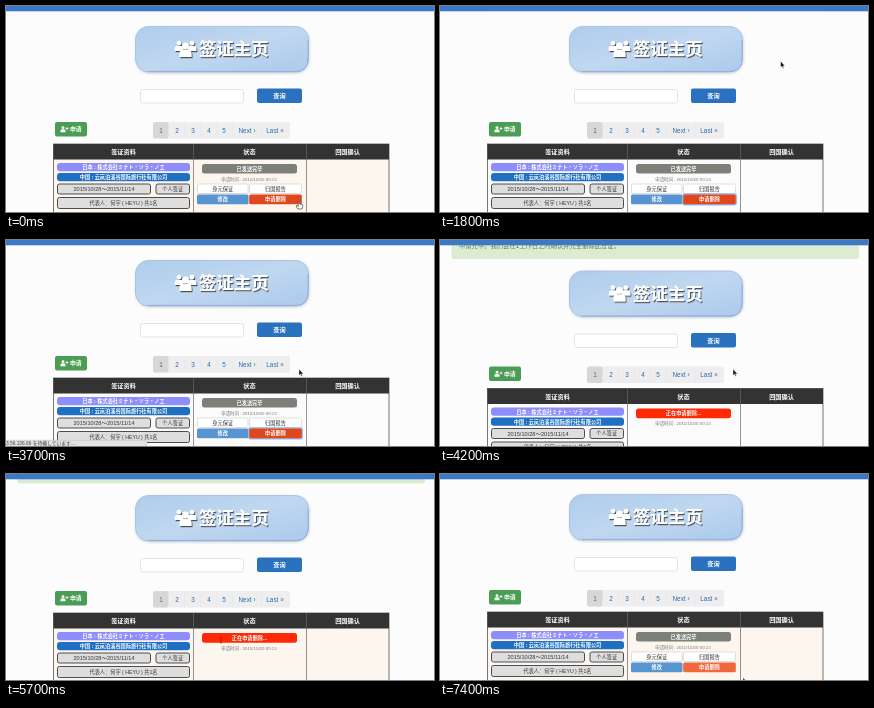
Write an HTML page that moves like this. It is 428 by 206 pixels and loops after 7500 ms.

```html
<!DOCTYPE html>
<html lang="zh-CN">
<head>
<meta charset="utf-8">
<title>签证主页</title>
<style>
  html, body { margin: 0; width: 100%; height: 100%; overflow: hidden; background: #fcfcfc; }
  svg { display: block; width: 428px; height: 206px; }
  text { font-family: "Liberation Sans", "Noto Sans CJK SC", "Noto Sans CJK", sans-serif; }
</style>
</head>
<body>
<svg id="stage" viewBox="0 0 428 206" xmlns="http://www.w3.org/2000/svg"></svg>
<script>
const LOOP = 7500;
const T = { dialogIn: 600, dialogOut: 1600, status: 2000, reload: 3900, statusOff: 4150,
            scroll: 5000, scrollEnd: 5500, reset: 6900 };

// time, x, y of the pointer tip
const PATH = [
  [0, 293, 195], [700, 292, 195], [1000, 292, 195], [1450, 343, 76], [1600, 343, 76],
  [1800, 340.5, 55], [2500, 340.5, 55], [3100, 293, 129], [4900, 293, 129],
  [5500, 215, 163], [5800, 215, 163], [6400, 320, 192], [7000, 316, 205],
  [7400, 303, 203.5], [7500, 293, 195]
];

const rect = (x, y, w, h, fill, r = 0, extra = "") =>
  `<rect x="${x}" y="${y}" width="${w}" height="${h}" rx="${r}" fill="${fill}" ${extra}/>`;
const label = (s, x, y, size, fill, extra = 'text-anchor="middle"') =>
  `<text x="${x}" y="${y + size * 0.37}" font-size="${size}" fill="${fill}" ${extra}>${s}</text>`;
const bold = 'text-anchor="middle" font-weight="700"';
const left = 'text-anchor="start"';
const box = (s, x, y, w, h, o = {}) =>
  rect(x, y, w, h, o.fill || "#fff", o.r ?? 1.5, o.line ? `stroke="${o.line}" stroke-width="${o.lw || 0.8}"` : "") +
  label(s, x + w / 2, y + h / 2, o.size || 5.2, o.ink || "#333", o.bold ? bold : undefined);

const person = (x, y, k) =>
  `<g transform="translate(${x} ${y}) scale(${k})"><circle cy="-4" r="3.4"/>` +
  `<path d="M-6 7V4Q-6 0 -2.5 0H2.5Q6 0 6 4V7Z"/></g>`;

function banner() {
  return rect(129.5, 20.5, 173, 45.5, "url(#sky)", 13, 'stroke="#a2bee0" stroke-width=".8" filter="url(#soft)"') +
    `<path d="M142 65.4H290Q302 65.4 302 53V34" fill="none" stroke="#92add2" stroke-width=".9"/>` +
    `<g fill="#fff" filter="url(#ink)">` +
    person(173, 40, 0.72) + person(186, 40, 0.72) + person(179.5, 44, 1) +
    label("签证主页", 227.7, 43, 17.5, "#fff", bold) + `</g>`;
}

function controls() {
  const pages = [[155, "1"], [171, "2"], [187, "3"], [203, "4"], [218, "5"], [241, "Next ›"], [269, "Last »"]];
  return rect(134.5, 83.5, 103, 13.5, "#fff", 2, 'stroke="#dedede" stroke-width=".8"') +
    box("查询", 251, 82.5, 45, 14.5, { fill: "#2a72c0", size: 6.2, ink: "#fff", bold: 1, r: 2 }) +
    rect(49, 116, 32, 14.5, "#4b9d55", 2) +
    `<g fill="#fff">${person(57, 123.3, 0.42)}</g>` +
    `<path d="M59.5 122.5h3M61 121v3" stroke="#fff" stroke-width=".8"/>` +
    label("申请", 69.8, 123.3, 5.9, "#fff", bold) +
    rect(147, 116, 137, 16.5, "#eeeeee", 2) + rect(147, 116, 15.5, 16.5, "#d7d7d7", 2) +
    [178.5, 194.5, 210.5, 226, 255.5].map(x => rect(x, 116, 0.4, 16.5, "#e0e0e0")).join("") +
    pages.map(([x, s], i) => label(s, x, 124.5, 6.4, i ? "#2d6ca8" : "#666")).join("");
}

function table() {
  const grey = { fill: "#dedede", line: "#4c4c4c", lw: 1, r: 2 };
  const heads = [[117.5, "签证资料"], [243.5, "状态"], [341.5, "回国确认"]];
  return `<rect id="row" x="47.5" y="138" width="335.5" height="80" stroke="#555" stroke-width=".8"/>` +
    rect(47.5, 138, 335.5, 15.5, "#333") +
    [187.3, 300].map(x => rect(x, 138, 0.7, 80, "#666")).join("") +
    heads.map(([x, s]) => label(s, x, 146, 6.2, "#fff", bold)).join("") +
    box("日本 : 株式会社ミナト・ソラ・ノエ", 51, 157, 133, 8.2, { fill: "#8d8dfb", ink: "#fff", bold: 1, r: 3 }) +
    box("中国 : 云岚泊溪谷国际旅行社有限公司", 51, 167, 133, 8.2, { fill: "#1f70c2", ink: "#fff", bold: 1, r: 3 }) +
    box("2015/10/28～2015/11/14", 51.5, 178, 93, 10, { ...grey, size: 5.6 }) +
    box("个人签证", 150, 178, 33.5, 10, grey) +
    box("代表人：何宇 ( HEYU ) 共1名", 51.5, 191.5, 132, 11, grey) +
    label("申请时间 : 2015/10/20 00:13", 243, 173, 4.4, "#777");
}

function sentState() {
  const plain = { line: "#d2d2d2", lw: 0.7 };
  return box("已发送完毕", 196, 158, 95, 9.5, { fill: "#7c8079", ink: "#fff", bold: 1, r: 2.5 }) +
    box("身元保证", 191.5, 178, 50.5, 9.5, plain) +
    box("归国报告", 243.5, 178, 52, 9.5, plain) +
    box("修改", 191, 188.5, 51.5, 9.8, { fill: "#5794d2", ink: "#fff", bold: 1 }) +
    `<rect id="ring" x="242.7" y="188" width="53.6" height="10.8" rx="2" fill="none" stroke="#8fbdf0" stroke-width="1.4"/>` +
    `<rect id="del" x="243.2" y="188.5" width="52.6" height="9.8" rx="1.5"/>` +
    label("申请删除", 269.5, 193.4, 5.2, "#fff", bold);
}

function dialog() {
  return rect(0, 0, 222, 88, "#f1f3f6", 4, 'filter="url(#drop)"') +
    `<circle cx="25" cy="32" r="14" fill="#d9503f"/>` +
    label("153.56.136.66 的网页", 51, 20, 7.6, "#555", left + ' font-weight="700"') +
    label("申请删除后，此签证将无法恢复，确定要申请删除此签证吗？", 51, 33, 6, "#777", left) +
    label("请再次确认。", 51, 42, 6, "#777", left) +
    rect(51, 51, 5, 5, "#fff", 1, 'stroke="#aaa" stroke-width=".7"') +
    label("禁止此页再显示对话框。", 59, 53.5, 6, "#888", left) +
    box("取消", 122, 65, 46, 11, { line: "#ccc", size: 6.5, ink: "#666", r: 3 }) +
    box("确定", 172, 65, 41, 11, { fill: "#3c95ee", ink: "#fff", size: 6.5, r: 3 });
}

const stage = document.getElementById("stage");
stage.innerHTML = `
<defs>
  <linearGradient id="sky" x1="0" y1="0" x2="1" y2="1">
    <stop offset="0" stop-color="#aecdec"/><stop offset=".5" stop-color="#c0d7f0"/><stop offset="1" stop-color="#abcaed"/>
  </linearGradient>
  <filter id="soft" x="-10%" y="-20%" width="120%" height="150%"><feDropShadow dx=".6" dy="1" stdDeviation=".8" flood-color="#7d8ca5" flood-opacity=".4"/></filter>
  <filter id="ink" x="-10%" y="-20%" width="120%" height="150%"><feDropShadow dx="1" dy="1.2" stdDeviation=".7" flood-color="#333" flood-opacity=".8"/></filter>
  <filter id="drop" x="-10%" y="-15%" width="120%" height="140%"><feDropShadow dx="0" dy="4" stdDeviation="4" flood-opacity=".35"/></filter>
</defs>
${rect(0, 0, 428, 206, "#fcfcfc")}
<g id="page">
  <g id="alert">${rect(12, -17, 406.5, 25, "#dcecd3", 2, 'stroke="#cfe3c2" stroke-width=".6"')}
  ${label("申请完毕。我们会在1工作日之内确认并完全删除此签证。", 19, -4.5, 6.3, "#5d7d5c", left)}</g>
  ${banner()}${controls()}${table()}
  <g id="sent">${sentState()}</g>
  <g id="pending">${box("正在申请删除...", 196, 158, 95, 9.7, { fill: "#ff2a05", ink: "#fff", bold: 1, r: 2.5 })}</g>
</g>
${rect(0, 0, 428, 5.3, "#3c78c3")}
<g id="status">${rect(-3, 200.3, 144, 9, "#e2e2e2", 2, 'stroke="#bbb" stroke-width=".5"')}
${label("3.56.136.66 を待機しています...", 0, 203.7, 4.8, "#444", left)}</g>
<g id="dialog">${dialog()}</g>
<g id="cursor">
  <path id="arrow" d="M0 0V6.6L1.5 5.3L2.5 7.6L3.5 7.1L2.5 4.9H4.5Z" fill="#111" stroke="#fff" stroke-width=".5"/>
  <path id="hand" d="M-.7 .7Q0 -.4 .7 .7V3L3.6 3.8V6.2L2.8 8H-1.2L-3 5L-2 4.4L-.7 5.4Z" fill="#fff" stroke="#222" stroke-width=".6"/>
  <path id="beam" d="M-1 0H1M0 0V6M-1 6H1" fill="none" stroke="#7a2010" stroke-width=".6"/>
</g>`;

const el = {};
stage.querySelectorAll("g[id], path[id], rect[id]").forEach(e => el[e.id] = e);
const show = (e, on) => e.style.display = on ? "" : "none";
const clamp = v => Math.max(0, Math.min(1, v));
const ease = p => p * p * (3 - 2 * p);

function pointer(t) {
  const i = PATH.findIndex(p => p[0] > t);
  const [t0, x0, y0] = PATH[i - 1], [t1, x1, y1] = PATH[i];
  const p = ease((t - t0) / (t1 - t0));
  return [x0 + (x1 - x0) * p, y0 + (y1 - y0) * p];
}

function draw(t) {
  const pending = t >= T.reload && t < T.reset;
  const scrolled = ease(clamp((t - T.scroll) / (T.scrollEnd - T.scroll)));
  const shift = pending ? 10.5 - 9.5 * scrolled : 0;
  el.page.setAttribute("transform", `translate(0 ${shift})`);
  show(el.alert, pending);
  show(el.pending, pending);
  show(el.sent, !pending);
  show(el.ring, t >= 300 && t < T.reload);
  el.del.setAttribute("fill", t >= T.reset ? "#f0683f" : "#e1471d");
  show(el.status, t >= T.status && t < T.statusOff);

  const grow = clamp((t - T.dialogIn) / 200), fade = clamp((t - T.dialogOut) / 100);
  const s = 0.06 + 0.94 * grow;
  show(el.dialog, grow > 0 && fade < 1);
  el.dialog.setAttribute("transform", `translate(${151 + (1 - s) * 110.6} ${9 + (1 - s) * 2}) scale(${s})`);
  el.dialog.setAttribute("opacity", Math.min(1, grow * 1.4) * (1 - fade));

  const [x, y] = pointer(t);
  el.cursor.setAttribute("transform", `translate(${x} ${y})`);
  // the table row is tinted while the pointer is over it
  const hover = x > 47 && x < 383 && y > 153 + shift;
  el.row.setAttribute("fill", hover ? "#fdf6ee" : "#fcfbfb");
  const hand = t < 600, beam = t >= 5450 && t < 5850;
  show(el.hand, hand);
  show(el.beam, beam);
  show(el.arrow, !hand && !beam);
}

const start = performance.now();
function tick() {
  draw((performance.now() - start) % LOOP);
  requestAnimationFrame(tick);
}
tick();
</script>
</body>
</html>
```
